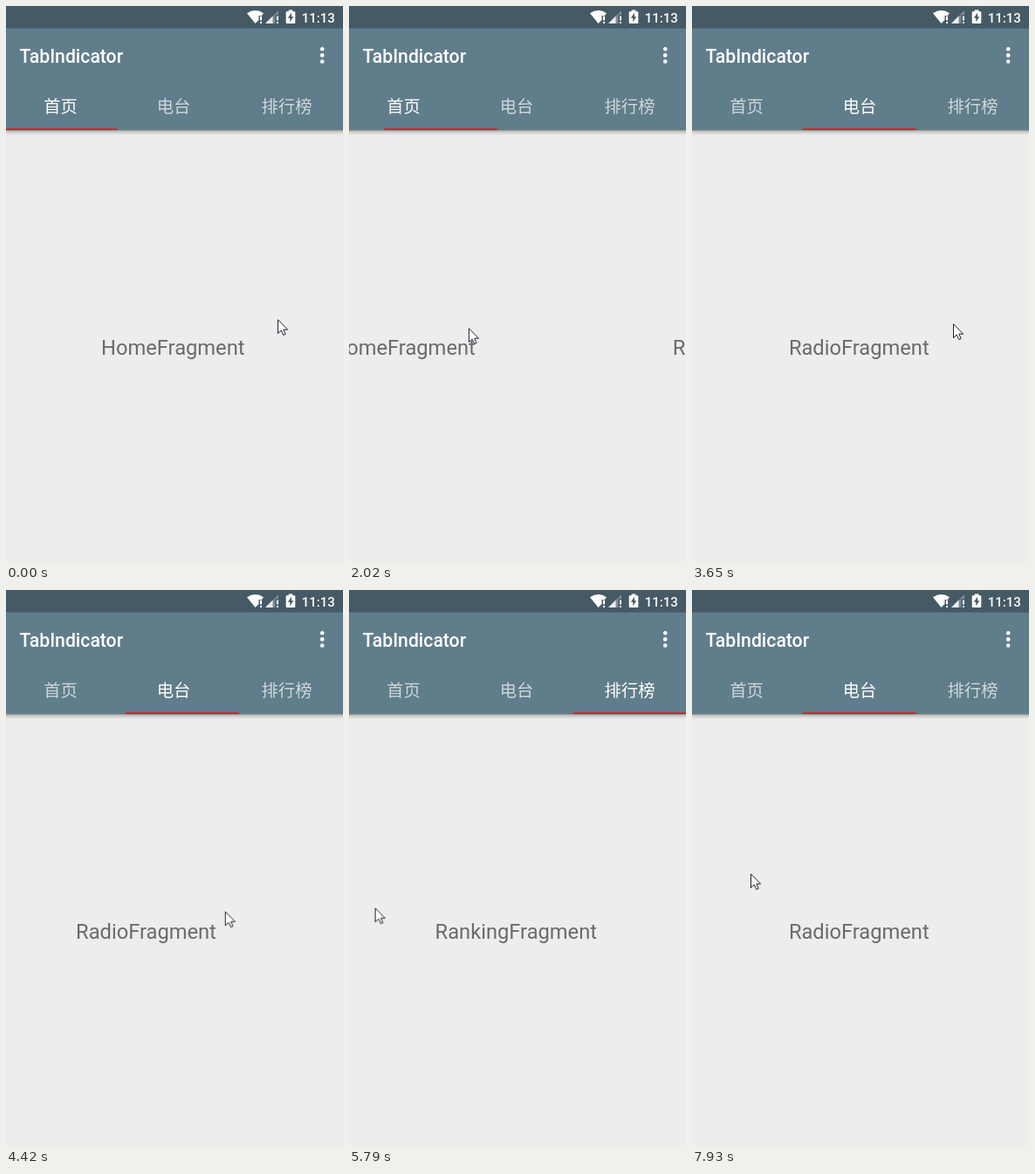
An HTML page for the animation above (7.99 s loop, 386 px wide and 636 px high).

```html
<!DOCTYPE html>
<html lang="zh-CN">
<head>
<meta charset="utf-8">
<title>TabIndicator</title>
<style>
@property --page { syntax: "<number>"; inherits: true; initial-value: 0; }
html, body { margin: 0; width: 100%; height: 100%; overflow: hidden; background: #ededed; }
svg { display: block; width: 386px; height: 636px; font-family: Roboto, sans-serif; animation: page 7990ms linear infinite; }
.pages { font-size: 23.7px; fill: #6b6b6b; text-anchor: middle; transform: translateX(calc(var(--page) * -388.5px)); }
.indicator { fill: #c02c2b; transform: translateX(calc(var(--page) * 129.5px - 2.7px)); }
.tabs { font: 19.3px "Noto Sans CJK SC", "Noto Sans CJK", sans-serif; fill: #fff; text-anchor: middle; }
.tabs text { opacity: .7; animation: 7990ms step-end infinite; }
.tabs .home { animation-name: home; }
.tabs .radio { animation-name: radio; }
.tabs .ranking { animation-name: ranking; }
.cursor { animation: cursor 7990ms linear infinite; }

@keyframes page {
  0%, 17.52% { --page: 0; }
  25.28% { --page: .331; }
  32.17% { --page: .512; animation-timing-function: cubic-bezier(.4, .15, .8, .7); }
  35.29% { --page: .81; animation-timing-function: cubic-bezier(.1, .7, .3, 1); }
  42.55% { --page: 1; }
  53.8% { --page: 1; animation-timing-function: ease-in; }
  56.07% { --page: 1.152; }
  61.95% { --page: 1.6265; }
  62.45% { --page: 1.68; animation-timing-function: cubic-bezier(.1, .7, .3, 1); }
  66.33% { --page: 2; }
  81.85% { --page: 2; animation-timing-function: ease-in; }
  84.36% { --page: 1.7635; animation-timing-function: cubic-bezier(.15, .65, .3, 1); }
  91%, 100% { --page: 1; }
}
@keyframes home { 0% { opacity: 1; } 36.04%, 100% { opacity: .7; } }
@keyframes radio {
  0% { opacity: .7; }
  36.04% { opacity: 1; }
  62.6% { opacity: .7; }
  83.5%, 100% { opacity: 1; }
}
@keyframes ranking { 0% { opacity: .7; } 62.6% { opacity: 1; } 83.5%, 100% { opacity: .7; } }
@keyframes cursor {
  0%, .5% { transform: translate(311px, 358px); }
  3%, 5% { transform: translate(311px, 344px); }
  6.76%, 8.8% { transform: translate(314px, 344px); }
  13.4%, 15.4% { transform: translate(317px, 366px); }
  25.28% { transform: translate(137px, 368px); }
  32.17% { transform: translate(63px, 368px); animation-timing-function: ease-in; }
  34.8%, 37% { transform: translate(-30px, 371px); }
  37% { animation-timing-function: cubic-bezier(.2, .3, .4, 1); }
  44.5%, 46.2% { transform: translate(299px, 363px); }
  50.7%, 53.2% { transform: translate(325px, 365px); }
  56.07% { transform: translate(225px, 368px); }
  60.7%, 70.5% { transform: translate(-30px, 367px); }
  70.5% { animation-timing-function: ease-out; }
  77.7%, 80.5% { transform: translate(187px, 353px); }
  80.5% { animation-timing-function: ease-in; }
  83.8% { transform: translate(400px, 360px); }
  90.4% { transform: translate(400px, 404px); }
  91.4% { transform: translate(371px, 400px); animation-timing-function: ease-out; }
  99%, 100% { transform: translate(67px, 324px); }
}
</style>
</head>
<body>
<svg viewBox="0 0 386 636">
  <defs>
    <linearGradient id="shadow" x2="0" y2="1">
      <stop stop-color="#000" stop-opacity=".34"/>
      <stop offset=".4" stop-color="#000" stop-opacity=".13"/>
      <stop offset="1" stop-color="#000" stop-opacity="0"/>
    </linearGradient>
  </defs>
  <rect width="386" height="636" fill="#ededed"/>
  <g class="pages">
    <text x="191.3" y="399">HomeFragment</text>
    <text x="579.8" y="399">RadioFragment</text>
    <text x="968.3" y="399">RankingFragment</text>
  </g>

  <rect y="142" width="386" height="6" fill="url(#shadow)"/>
  <rect width="386" height="142" fill="#607d8b"/>
  <rect width="386" height="25.6" fill="#455a64"/>

  <g fill="#fff">
    <path d="M276 8.3Q285.5 1.8 295 8.3L292.8 11H289.5V16L285.5 20Z"/>
    <path d="M291 11.5h2v5h-2zM291 18h2v2h-2zM310 11.5h2v5h-2zM310 18h2v2h-2z"/>
    <path d="M297 20L312 5V10H308.5V20Z" opacity=".3"/>
    <path d="M297 20L305.5 11.5V20Z" opacity=".85"/>
    <path d="M323.7 6.2V4.5h4.6v1.7h2.2q.8 0 .8.8v12.2q0 .8-.8.8h-9q-.8 0-.8-.8V7q0-.8.8-.8Z"/>
    <path d="M327 7.8L322.8 13.7H325.3V18.2L329.3 12.2H327Z" fill="#455a64"/>
    <text x="338.7" y="18.7" font-size="15" font-weight="500">11:13</text>
    <text x="15.6" y="64.5" font-size="21.2" font-weight="500">TabIndicator</text>
    <circle cx="362.2" cy="49.3" r="2.3"/>
    <circle cx="362.2" cy="56.4" r="2.3"/>
    <circle cx="362.2" cy="63.5" r="2.3"/>
  </g>

  <g class="tabs">
    <text class="home" x="62.5" y="121.5">首页</text>
    <text class="radio" x="192" y="121.5">电台</text>
    <text class="ranking" x="321.5" y="121.5">排行榜</text>
  </g>
  <rect class="indicator" y="140" width="129.5" height="2"/>

  <path class="cursor" d="M.5 .8V16.6L4.2 13.1L6.8 18.5L9.2 17.4L6.8 12.2H11.6Z" fill="#fff" stroke="#1c1c2c"/>
</svg>
</body>
</html>
```
